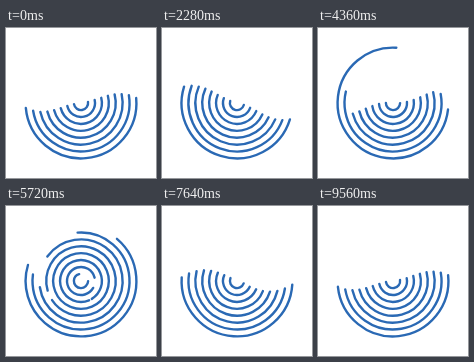
An HTML page with a canvas that plays this animation: 150 by 150 pixels, repeating every 9600 ms.

```html
<!DOCTYPE html>
<html>
<head>
<meta charset="utf-8">
<style>
  html, body { margin: 0; width: 100%; height: 100%; overflow: hidden; background: #fff; }
  canvas { display: block; }
</style>
</head>
<body>
<canvas id="stage" width="150" height="150"></canvas>
<script>
const ctx = document.getElementById('stage').getContext('2d');
const LOOP = 9600, STEP = 40, RINGS = 8, DELAY = 200;
const OUTER = 55.4, GAP = 6.9;
const RAD = Math.PI / 180;

const progress = (t, start, duration) => Math.min(1, Math.max(0, (t - start) / duration));
const easeInOut = x => (1 - Math.cos(Math.PI * x)) / 2;

// cubic-bezier(.25, .1, .25, 1)
function ease(x) {
  const bezier = (a, b, s) => 3 * a * s * (1 - s) ** 2 + 3 * b * s * s * (1 - s) + s ** 3;
  let low = 0, high = 1;
  for (let i = 0; i < 20; i++) {
    const mid = (low + high) / 2;
    if (bezier(.25, .25, mid) < x) low = mid; else high = mid;
  }
  return bezier(.1, 1, (low + high) / 2);
}

// Every ring sways; once per loop its head runs a full turn and its tail follows.
function drawRing(index, time) {
  const t = (time - index * DELAY + LOOP) % LOOP;
  const sway = 4.75 + 19.75 * Math.cos(2 * Math.PI * (t - 1600) / 4800);
  const tail = sway + 360 * easeInOut(progress(t, 4000, 2400));
  const head = sway + 180 + 360 * ease(progress(t, 4000, 1800));
  ctx.beginPath();
  ctx.arc(75, 75, OUTER - index * GAP, tail * RAD, head * RAD);
  ctx.stroke();
}

function draw() {
  const time = Math.floor(performance.now() % LOOP / STEP) * STEP;
  ctx.clearRect(0, 0, 150, 150);
  ctx.strokeStyle = '#2a69b4';
  ctx.lineWidth = 2.4;
  ctx.lineCap = 'round';
  for (let i = 0; i < RINGS; i++) drawRing(i, time);
  requestAnimationFrame(draw);
}
draw();
</script>
</body>
</html>
```
